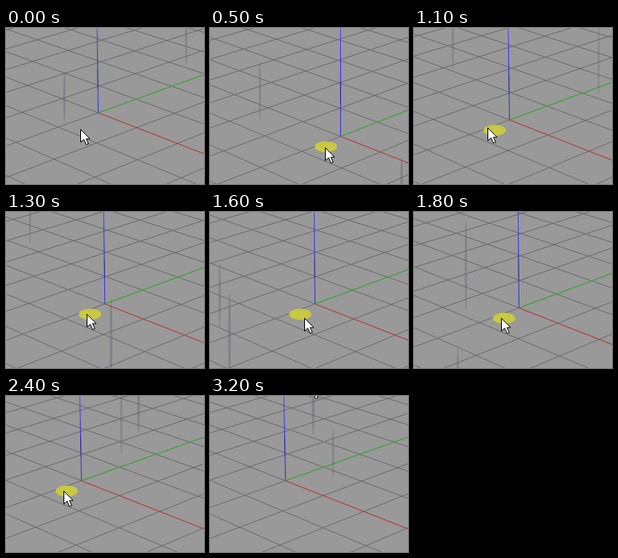
Recreate the animation shown at these times as an HTML page with a canvas. Size 248 by 196 pixels, loop 3300 ms.

```html
<!DOCTYPE html>
<html lang="en">
<head>
<meta charset="utf-8">
<title>Viewport pan</title>
<style>
html, body { margin: 0; width: 100%; height: 100%; overflow: hidden; background: #999; }
canvas { display: block; }
</style>
</head>
<body>
<canvas id="view" width="248" height="196"></canvas>
<script>
const W = 248, H = 196, LOOP = 3300, STEP = 100;
const ctx = document.getElementById('view').getContext('2d');

// Vanishing points of the three axes; panning moves only the origin.
const GREEN = { x: 1820, y: -510, unit: 0.0285 };
const RED = { x: -1470, y: -510, unit: 0.0295 };
const DOWN = { x: 165, y: 3936 };

// Key points: time, x, y
const originPath = [[0, 115, 106], [700, 175, 143], [1100, 119, 115], [1600, 131, 115],
  [2000, 131, 125], [2400, 94, 106]];
const cursorPath = [[0, 93, 127], [700, 157, 156], [1100, 92, 125], [1600, 118, 133],
  [2000, 99, 133], [2400, 72, 119], [2800, 67, 122], [3200, 125, -16]];

function along(path, t) {
  const next = path.findIndex(p => p[0] > t);
  if (next < 0) return path[path.length - 1].slice(1);
  const [t0, x0, y0] = path[next - 1], [t1, x1, y1] = path[next];
  const k = (t - t0) / (t1 - t0), e = k * k * (3 - 2 * k);
  return [x0 + (x1 - x0) * e, y0 + (y1 - y0) * e];
}

function random(seed) {
  const s = Math.sin(seed * 12.9898) * 43758.5453;
  return s - Math.floor(s);
}

function line(x0, y0, x1, y1, color) {
  ctx.strokeStyle = color;
  ctx.beginPath();
  ctx.moveTo(x0, y0);
  ctx.lineTo(x1, y1);
  ctx.stroke();
}

function drawGround([ox, oy]) {
  const project = (i, j) => {
    const a = i * GREEN.unit, b = -j * RED.unit, w = 1 + a + b;
    return [(ox + a * GREEN.x + b * RED.x) / w, (oy + a * GREEN.y + b * RED.y) / w];
  };
  const join = (p, q, color) => line(...p, ...q, color);
  for (let n = -9; n <= 32; n++) {
    join(project(n, -32), project(n, 9), '#6a6a6a');
    join(project(-9, -n), project(32, -n), '#6a6a6a');
  }
  join(project(0, 0), project(9, 0), '#30b430');
  join(project(0, 0), project(0, 9), '#cc3a3a');
}

function drawUpAxis([ox, oy]) {
  const top = ox + (ox - DOWN.x) * oy / (DOWN.y - oy);
  const shade = ctx.createLinearGradient(0, 0, 0, oy);
  shade.addColorStop(0, '#4646f4');
  shade.addColorStop(0.46, '#2828f0');
  shade.addColorStop(0.54, '#1414a0');
  shade.addColorStop(0.66, '#1414a0');
  shade.addColorStop(0.74, '#3232e6');
  line(top, 0, ox, oy, shade);
}

// Faint streaks fall at random, pause, then return in a narrow band.
function drawStreaks(t) {
  if (t > 2400 && t < 2900) return;
  const late = t >= 2900;
  const [left, span] = late ? [95, 68] : [4, 240];
  for (let i = 0; i < 2; i++) {
    const r = k => random(t / STEP * 7 + i * 31 + k);
    const length = 50 + r(3) * 70, middle = r(2) * 230 - 10;
    ctx.beginPath();
    ctx.ellipse(left + r(1) * span, middle, 0.8 + r(4), length / 2, 0, 0, Math.PI * 2);
    ctx.fillStyle = 'rgba(100,104,110,.45)';
    ctx.fill();
  }
}

// The disc stays on the ground beside the origin.
function drawDisc([ox, oy]) {
  ctx.beginPath();
  ctx.ellipse(ox - 18.5, oy + 13, 14, 7, 0, 0, Math.PI * 2);
  ctx.fillStyle = 'rgba(204,204,60,.92)';
  ctx.fill();
}

function drawCursor([x, y]) {
  const shape = [[0, 0], [0, 16], [4, 12.5], [7, 19], [9.8, 18], [6.9, 11.7], [11.5, 11.7]];
  ctx.beginPath();
  shape.forEach(([dx, dy]) => ctx.lineTo(Math.round(x) + dx, Math.round(y) + dy));
  ctx.closePath();
  ctx.fillStyle = '#fff';
  ctx.fill();
  ctx.strokeStyle = '#000';
  ctx.stroke();
}

function draw(t) {
  const origin = along(originPath, t);
  ctx.setTransform(1, 0, 0, 1, 0, 0);
  ctx.fillStyle = '#999';
  ctx.fillRect(0, 0, W, H);
  ctx.translate(0.5, 0.5);
  ctx.lineWidth = 1;
  drawGround(origin);
  drawUpAxis(origin);
  drawStreaks(t);
  if (t >= 200 && t < 2600) drawDisc(origin);
  drawCursor(along(cursorPath, t));
}

const start = performance.now();
function tick() {
  const t = (performance.now() - start) % LOOP;
  draw(Math.floor(t / STEP) * STEP);
  requestAnimationFrame(tick);
}
tick();
</script>
</body>
</html>
```
